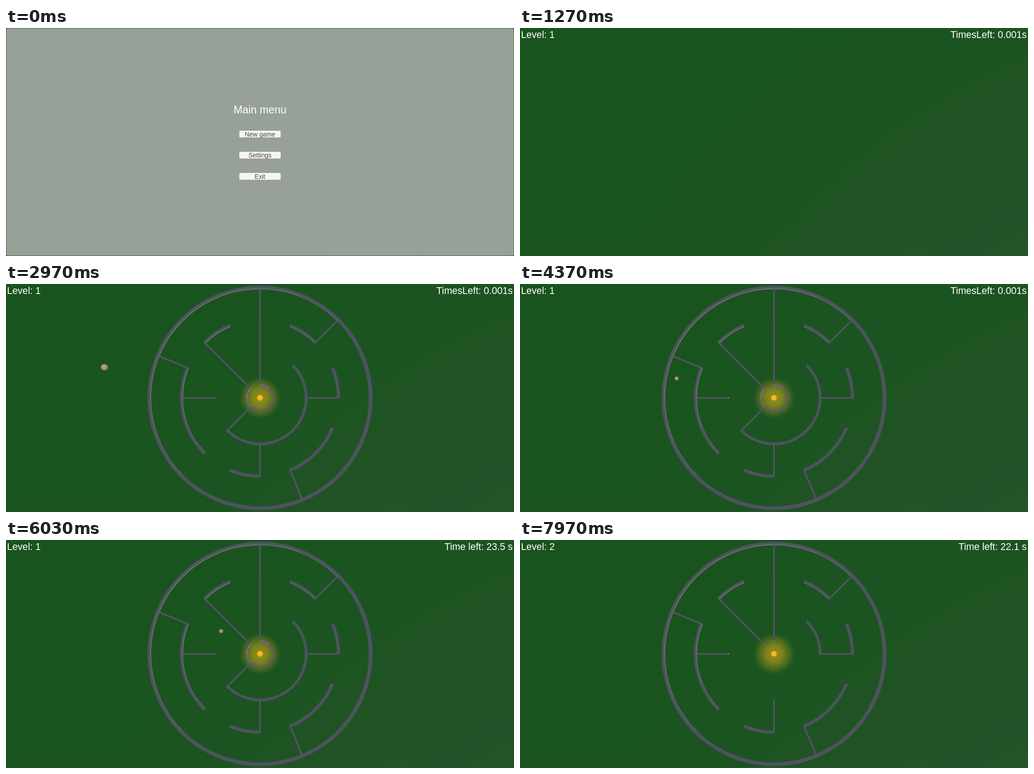
Animation of 1116x502 px, one loop 8000 ms. Source, as an HTML page with a canvas:

```html
<!DOCTYPE html>
<html lang="en">
<head>
<meta charset="utf-8">
<title>Circular maze</title>
<style>
  html, body { margin: 0; width: 100%; height: 100%; overflow: hidden; background: #1a541e; }
  canvas { display: block; width: 1116px; height: 502px; }
</style>
</head>
<body>
<canvas id="stage" width="1116" height="502"></canvas>
<script>
const W = 1116, H = 502, CX = 558, CY = 250.7, LOOP = 8000, TICK = 100 / 3;
const PRESS = 1130, MENU_END = 1260, SPAWN = 2430, ROLL = 2570, INSIDE = 4200;
const TIMER_START = 4530, FINISH = 7430, TEARDOWN = 7598;
const g = document.getElementById('stage').getContext('2d');
const FONT = '"Liberation Sans", Arial, sans-serif';
const WALL = '#4e535f', LIT = '#6b6c70';

const clamp = v => Math.min(1, Math.max(0, v));
const mix = (a, b, u) => a + (b - a) * u;

// Angles are degrees clockwise from the top.
const rad = a => (a - 90) * Math.PI / 180;
const polar = (a, r) => [CX + Math.cos(rad(a)) * r, CY + Math.sin(rad(a)) * r];
const litness = a => Math.max(0, Math.cos((a - 315) * Math.PI / 180));

// Cells run clockwise from the left: a = arc, w = wall inwards, b = both.
const rings = [
  { r: 243, w: 8, to: 171, cells: 'abaababaaaabaaaa', start: 1290, tick: 23 },
  { r: 172.5, w: 7, to: 99, cells: 'b.b.wa.awaa.b.aa', start: 1662, tick: TICK },
  { r: 101.5, w: 6, to: 29, cells: '.wwaaaaw', start: 2195, tick: TICK },
  { r: 29.5, w: 4.5, cells: 'a.aaaaaa', start: ROLL, tick: TICK, core: true }
];

const cells = rings.flatMap(ring => [...ring.cells].map((kind, i) => {
  const step = 360 / ring.cells.length;
  return { ring, kind, step, a: (270 + i * step) % 360, on: ring.start + i * ring.tick };
}));
cells.reverse().forEach((c, i) => c.off = TEARDOWN + i * TICK);
cells.reverse();

// Way through the maze: time, angle, radius
const way = [
  [INSIDE, 281.2, 234.5], [4370, 281.3, 218], [4880, 280, 202], [5600, 214, 205],
  [5760, 214, 140], [5900, 262, 84], [6030, 300.3, 98.5], [6240, 312.5, 172],
  [6330, 318, 196], [6500, 326, 208], [6850, 348, 206], [7000, 348, 150],
  [7330, 338, 28], [FINISH, 338, 0]
];

function ballAt(t) {
  if (t < INSIDE) {
    const s = Math.max(0, t - ROLL) / 1000;
    return [209 + 45 * s * s, 182 + 8.7 * s * s];
  }
  const i = way.findIndex(p => p[0] > t), p = way[i - 1], q = way[i];
  const u = (t - p[0]) / (q[0] - p[0]);
  return polar(mix(p[1], q[1], u), mix(p[2], q[2], u));
}

function text(str, x, y, size, color, align) {
  g.font = size + 'px ' + FONT;
  g.fillStyle = color;
  g.textAlign = align;
  g.fillText(str, x, y);
}

function box(x, y, w, h, r, color) {
  g.fillStyle = color;
  g.beginPath();
  g.roundRect(x, y, w, h, r);
  g.fill();
}

function disc(x, y, rx, ry, fill) {
  g.fillStyle = fill;
  g.beginPath();
  g.ellipse(x, y, rx, ry, 0, 0, 7);
  g.fill();
}

function strokeArc(r, w, a, b, color) {
  g.lineWidth = w;
  g.strokeStyle = color;
  g.beginPath();
  g.arc(CX, CY, r, rad(a), rad(b));
  g.stroke();
}

function strokeWall(a, r0, r1, color) {
  g.lineWidth = 4;
  g.strokeStyle = color;
  g.beginPath();
  g.moveTo(...polar(a, r0));
  g.lineTo(...polar(a, r1));
  g.stroke();
}

function radial(x0, y0, r0, x1, y1, r1, stops) {
  const grad = g.createRadialGradient(x0, y0, r0, x1, y1, r1);
  stops.forEach(([o, c]) => grad.addColorStop(o, c));
  return grad;
}

const field = radial(1695, 1435, 1100, 1695, 1435, 1850, [
  [0, '#225527'], [.14, '#215329'], [.2, '#215426'], [.47, '#205323'],
  [.54, '#1c5421'], [.88, '#1a541f'], [1, '#19531d']
]);
const halo = radial(CX, CY, 4, CX, CY, 47, [
  [0, 'rgba(152,144,32,.95)'], [.35, 'rgba(138,136,32,.85)'],
  [.7, 'rgba(110,124,30,.5)'], [1, 'rgba(70,110,30,0)']
]);
const gem = radial(CX - 1, CY - 1, 1, CX, CY, 6.8, [
  [0, '#ffc21c'], [.7, '#fbb316'], [1, '#e68e17']
]);

function drawWall({ ring, a }) {
  strokeWall(a, ring.r + 1.5, ring.to, WALL);
  if (litness(a) > .6) strokeWall(a, ring.to + 1.2, ring.to, '#8b8a88');
}

function drawArc({ ring, a, step }) {
  const end = a + step, light = litness(a + step / 2);
  strokeArc(ring.r, ring.w, a - .15, end + .15, ring.core ? '#665965' : WALL);
  g.globalAlpha = Math.pow(light, .6);
  strokeArc(ring.r - ring.w / 2 + 1.3, 2.6, a, end, ring.core ? '#86766f' : LIT);
  g.globalAlpha = 1;
}

function drawBall(t) {
  const [x, y] = ballAt(t);
  const k = clamp((t - 2970) / (INSIDE - 2970));
  const r = mix(8.4, 4.8, k), ry = r * mix(.85, .97, k);
  disc(x, y, r, ry, radial(x - r * .3, y - r * .3, r * .1, x, y, r, [
    [0, '#bda28e'], [.6, '#a98b79'], [1, '#7d6354']
  ]));
}

function drawMenu(t) {
  box(.8, .8, W - 1.6, H - 1.6, 3, '#98a197');
  text('Main menu', CX, 188, 23.5, '#fff', 'center');
  ['New game', 'Settings', 'Exit'].forEach((label, i) => {
    const y = 225.6 + i * 46.6;
    const tone = i ? 245 : mix(245, 200, clamp((t - PRESS) / 100));
    box(512, y, 92, 16, 3, '#838a83');
    box(512.5, y + .3, 91, 15.1, 2.5, `rgb(${tone},${tone},${tone})`);
    text(label, CX, y + 12.9, 14, '#4a4a4a', 'center');
  });
}

function drawGame(t) {
  g.fillStyle = '#34503a';
  g.fillRect(0, H - 1, W, 1);
  if (t >= ROLL) {
    disc(CX, CY, 47, 47, halo);
    disc(CX, CY, 6.6, 6.6, gem);
  }
  for (const c of cells) {
    if (t < c.on || t >= c.off) continue;
    if ('wb'.includes(c.kind)) drawWall(c);
    if ('ab'.includes(c.kind)) drawArc(c);
  }
  if (t >= SPAWN && t < FINISH) drawBall(t);

  const left = 25 - (Math.min(t, FINISH) - TIMER_START) / 1000;
  text('Level: ' + (t < FINISH ? 1 : 2), 2.2, 22, 21.2, '#fff', 'left');
  text(t < TIMER_START ? 'TimesLeft: 0.001s' : 'Time left: ' + left.toFixed(1) + ' s',
    1113.2, 22, 21.2, '#fff', 'right');
}

function frame() {
  const t = performance.now() % LOOP;
  g.fillStyle = field;
  g.fillRect(0, 0, W, H);
  if (t < MENU_END) drawMenu(t);
  else drawGame(t);
  requestAnimationFrame(frame);
}
frame();
</script>
</body>
</html>
```
